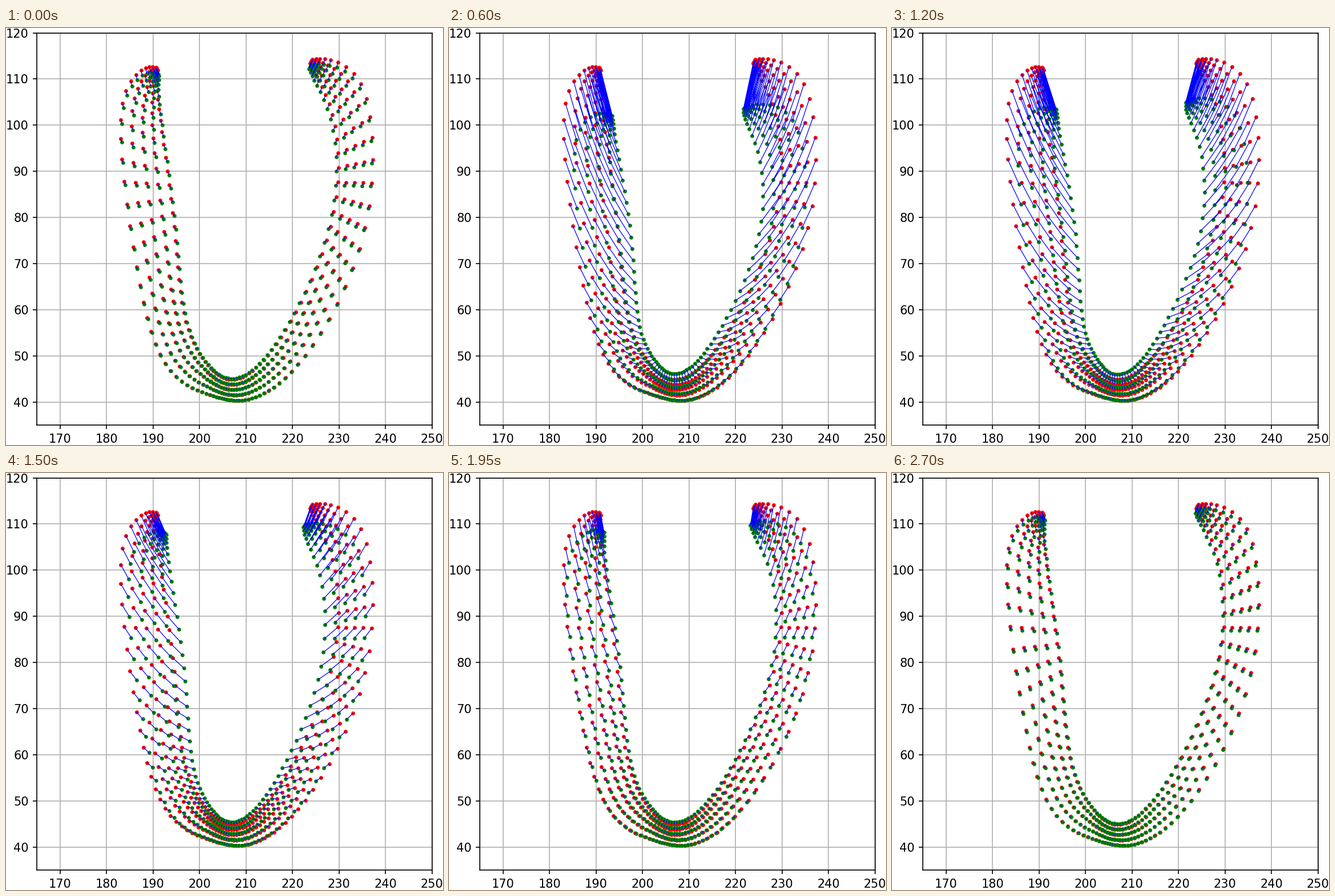
A matplotlib script that plays this animation: 766 px wide and 731 px high, repeating every 2.85 s.

```python
import numpy as np
import matplotlib.pyplot as plt
from matplotlib.animation import FuncAnimation

WIDTH, HEIGHT, DPI = 766, 731, 150
LEFT, RIGHT, TOP, BOTTOM = 54.3, 746.6, 8.6, 696
STEPS, STATIONS, LAYERS = 19, 81, 5

# station along the wall: outer x, y and inner x, y
WALL_KEYS = np.array([
    (0, 190.6, 112.5, 191.0, 111.9),
    (4, 187.4, 111.9, 190.9, 107.4),
    (8, 183.4, 104.7, 191.9, 98.5),
    (14, 185.0, 78.1, 194.2, 81.0),
    (22, 191.5, 50.3, 196.6, 59.4),
    (30, 200.5, 42.2, 201.2, 48.7),
    (40, 206.8, 40.4, 206.8, 44.9),
    (50, 213.9, 41.9, 213.8, 49.1),
    (58, 224.4, 52.4, 221.8, 61.6),
    (66, 236.5, 82.5, 229.4, 84.4),
    (72, 234.7, 108.9, 228.6, 102.3),
    (76, 228.2, 114.1, 225.6, 109.7),
    (80, 224.3, 114.3, 223.8, 113.4),
])

# step of the beat: strength of the sideways and lengthwise motion
BEAT_KEYS = np.array([
    (0, .11, .12), (4, 1, 1), (6.5, 1.23, 1.16), (10, .72, .42),
    (11.5, .47, .37), (13, .29, .38), (16, .20, .27), (18, .09, .11),
])


def spline(keys, count):
    """Natural cubic spline through the keys, sampled at 0 .. count - 1."""
    t, v = keys[:, 0], keys[:, 1:]
    h = np.diff(t)
    slope = np.diff(v, axis=0) / h[:, None]
    system, bend = np.eye(len(t)), np.zeros_like(v)
    for k in range(1, len(t) - 1):
        system[k, k - 1:k + 2] = h[k - 1], 2 * (h[k - 1] + h[k]), h[k]
        bend[k] = 6 * (slope[k] - slope[k - 1])
    m = np.linalg.solve(system, bend)

    at = np.arange(count)
    i = np.clip(np.searchsorted(t, at, side="right") - 1, 0, len(t) - 2)
    a, b, w = ((x[:, None]) for x in (t[i + 1] - at, at - t[i], h[i]))
    return ((m[i] * a ** 3 + m[i + 1] * b ** 3) / (6 * w)
            + (v[i] / w - m[i] * w / 6) * a
            + (v[i + 1] / w - m[i + 1] * w / 6) * b)


def wall_shift():
    """Inward and downward pull: none at the apex, strongest at the top."""
    s = np.linspace(-1, 1, STATIONS)
    r = np.abs(s)

    def pull(power):
        return np.sin(np.pi / 2 * r ** power) ** 2

    outer_x = -2.45 * np.sign(s) * np.sin((1.95 + .15 * s) * r ** 1.5)
    inner_x = (-3.7 * np.sign(s) * (1 + .1 * s)
               * np.sin((2.45 + .15 * s) * r ** 1.4))
    outer_y = -10.3 * pull(1.75)
    inner_y = 1.24 - 11.1 * pull(1.36)
    return np.column_stack([outer_x, outer_y, inner_x, inner_y])


def across_wall(edges):
    """Blend the outer edge into the inner edge, layer by layer."""
    depth = np.linspace(0, 1, LAYERS)[:, None, None]
    return ((1 - depth) * edges[:, :2] + depth * edges[:, 2:]).reshape(-1, 2)


start = across_wall(spline(WALL_KEYS, STATIONS))
shift = across_wall(wall_shift())
beat = spline(BEAT_KEYS, STEPS)

fig = plt.figure(figsize=(WIDTH / DPI, HEIGHT / DPI), dpi=DPI, facecolor="white")
ax = fig.add_axes([LEFT / WIDTH, 1 - BOTTOM / HEIGHT,
                   (RIGHT - LEFT) / WIDTH, (BOTTOM - TOP) / HEIGHT])
ax.set(xlim=(165, 250), ylim=(35, 120),
       xticks=range(170, 251, 10), yticks=range(40, 121, 10))
ax.grid(True)

dots = dict(marker="o", ls="none", ms=3.3, mew=0)
ax.plot(*start.T, color="red", **dots)
moving, = ax.plot([], [], color="green", **dots)
links, = ax.plot([], [], color="blue", lw=0.6)


def draw(step):
    end = start + shift * beat[step]
    moving.set_data(*end.T)
    gap = np.full_like(start, np.nan)
    links.set_data(*np.stack([start, end, gap], axis=1).reshape(-1, 2).T)
    return moving, links


anim = FuncAnimation(fig, draw, frames=STEPS, interval=150,
                     repeat=True, repeat_delay=0)
plt.show()
```
